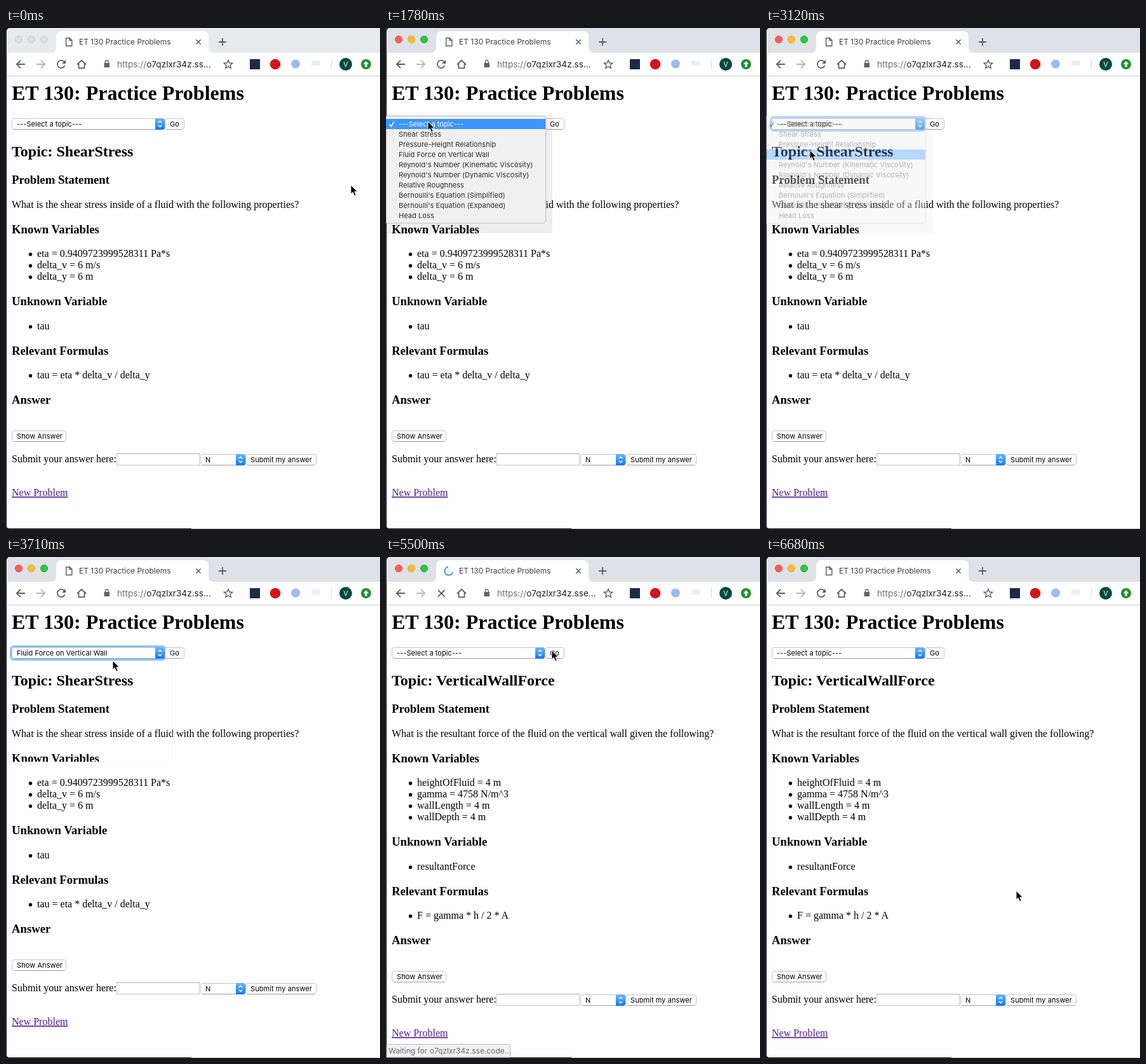
These frames come from a looping animation (589x788 px, 8 s). An HTML page:

```html
<!DOCTYPE html>
<html lang="en">
<head>
<meta charset="utf-8">
<title>Practice Problems</title>
<style>
html, body { margin: 0; width: 100%; height: 100%; overflow: hidden; background: #fff; }
svg { display: block; width: 589px; height: 788px; }
text { white-space: pre; }
.serif { font: 16px "Liberation Serif", "Times New Roman", serif; }
.h1, .h2, .h3 { font: bold 32px "Liberation Serif", "Times New Roman", serif; }
.h2 { font-size: 24px; }
.h3 { font-size: 18.72px; }
.ui { font: 11px Inter, sans-serif; letter-spacing: .07px; }
.tab { font: 12px Inter, sans-serif; fill: #3c4043; }
.url { font: 13.6px Inter, sans-serif; fill: #202124; }
.link { fill: #551a8b; text-decoration: underline; }
.icon { fill: none; stroke: #5a5e63; stroke-width: 1.8; }
</style>
</head>
<body>
<svg id="stage" viewBox="0 0 589 788" xmlns="http://www.w3.org/2000/svg"></svg>
<script>
const LOOP = 8000;
const T = { focus: 1190, ring: 1490, open: 1640, fade: 3120, closed: 3270,
            press: 4760, load: 4900, commit: 5500, badge: 5640, done: 6090 };

// time, x, y of the pointer tip
const POINTER = [
  [0, 543, 247], [300, 522, 218], [450, 395, 134], [590, 190, 64], [740, 60, 94], [890, 27, 140],
  [1490, 60, 148], [1640, 66, 147], [2230, 68, 162], [2380, 69, 177], [2530, 69, 192],
  [3270, 65, 184], [3560, 96, 178], [3710, 168, 163], [3860, 238, 150], [4010, 261, 147],
  [6240, 288, 214], [6390, 342, 372], [6540, 383, 494], [6680, 394, 525]
];
// time, highlighted menu row
const ROWS = [[0, 0], [2230, 1], [2380, 2], [2530, 3]];
const TOPICS = ["---Select a topic---", "Shear Stress", "Pressure-Height Relationship",
  "Fluid Force on Vertical Wall", "Reynold's Number (Kinematic Viscosity)",
  "Reynold's Number (Dynamic Viscosity)", "Relative Roughness",
  "Bernoulli's Equation (Simplified)", "Bernoulli's Equation (Expanded)", "Head Loss"];
const PROBLEMS = [{
  topic: "ShearStress",
  ask: "What is the shear stress inside of a fluid with the following properties?",
  known: ["eta = 0.9409723999528311 Pa*s", "delta_v = 6 m/s", "delta_y = 6 m"],
  unknown: "tau", formula: "tau = eta * delta_v / delta_y"
}, {
  topic: "VerticalWallForce",
  ask: "What is the resultant force of the fluid on the vertical wall given the following?",
  known: ["heightOfFluid = 4 m", "gamma = 4758 N/m^3", "wallLength = 4 m", "wallDepth = 4 m"],
  unknown: "resultantForce", formula: "F = gamma * h / 2 * A"
}];

const text = (x, y, s, cls = "serif", more = "") => `<text x="${x}" y="${y}" class="${cls}" ${more}>${s}</text>`;
const rect = (x, y, w, h, fill, more = "") => `<rect x="${x}" y="${y}" width="${w}" height="${h}" fill="${fill}" ${more}/>`;
const circle = (x, y, r, fill, more = "") => `<circle cx="${x}" cy="${y}" r="${r}" fill="${fill}" ${more}/>`;
const path = (d, more = 'class="icon"') => `<path d="${d}" ${more}/>`;
const group = (id, body, more = "") => `<g id="${id}" ${more}>${body}</g>`;
const item = (y, s) => circle(38.5, y - 4, 2.7, "#000") + text(49, y, s);

function button(x, y, w, label, fill = "#fff", edge = "#c4c4c4") {
  return rect(x + .5, y + .5, w - 1, 17, fill, `rx="3.5" stroke="${edge}"`) +
    path(`M${x + 3} ${y + 17.5}h${w - 6}`, 'stroke="#0003"') +
    text(x + 8, y + 13, label, "ui");
}

function select(x, y, w, label) {
  const r = x + w, c = r - 7.5;
  return rect(x + .5, y + .5, w - 1, 17, "#fff", 'rx="3.5" stroke="#c4c4c4"') +
    path(`M${x + 3} ${y + 17.5}h${w - 6}`, 'stroke="#0003"') +
    path(`M${r - 15} ${y}h11.5a3.5 3.5 0 0 1 3.5 3.5v11a3.5 3.5 0 0 1-3.5 3.5h-11.5z`, 'fill="url(#blue)"') +
    path(`M${c - 2.7} ${y + 7.3}l2.7-2.8 2.7 2.8M${c - 2.7} ${y + 10.7}l2.7 2.8 2.7-2.8`,
      'fill="none" stroke="#fff" stroke-width="1.4"') +
    text(x + 8, y + 13, label, "ui");
}

function problem(p, id) {
  const d = 18 * (p.known.length - 3);
  return group(id,
    text(9, 202, "Topic: " + p.topic, "h2") +
    text(9, 245, "Problem Statement", "h3") + text(9, 283, p.ask) +
    text(9, 323, "Known Variables", "h3") +
    p.known.map((s, i) => item(360 + 18 * i, s)).join("") +
    `<g transform="translate(0 ${d})">` +
    text(9, 436, "Unknown Variable", "h3") + item(474, p.unknown) +
    text(9, 514, "Relevant Formulas", "h3") + item(551, p.formula) +
    text(9, 591, "Answer", "h3") +
    button(9, 633, 86, "Show Answer") +
    text(9, 683, "Submit your answer here:") +
    rect(174.5, 669.5, 130, 18, "#fff", 'stroke="#c6c6c6"') +
    path("M174 669.5h131", 'stroke="#a8a8a8"') +
    select(306, 670, 71, "N") + button(377, 670, 112, "Submit my answer") +
    text(9, 736, "New Problem", "serif link") + "</g>");
}

const lights = (colors, edges) => colors.map((c, i) => circle(20 + 20 * i, 18, 5.5, c, `stroke="${edges[i]}"`)).join("");

function chrome() {
  return group("strip", rect(1, 0, 588, 39, "currentColor")) +
    group("lightsOff", lights(Array(3).fill("#dddfe2"), Array(3).fill("#c9cbce"))) +
    group("lightsOn", lights(["#ff5f57", "#ffbd2e", "#28c940"], ["#e2463f", "#e0a028", "#1dad2b"])) +
    path("M71 39a8 8 0 0 0 8-8V13a8 8 0 0 1 8-8h224a8 8 0 0 1 8 8v18a8 8 0 0 0 8 8z", 'fill="#fff"') +
    group("fileIcon", path("M94.7 15.7h5.6l3.5 3.5v9.1h-9.1zM100 15.7v3.8h3.8", 'class="icon" style="stroke-width:1.4"')) +
    group("spinner", path("M-6.3 1.5A6.5 6.5 0 1 1 4 5.1", 'fill="none" stroke="currentColor" stroke-width="2"')) +
    text(115, 26, "ET 130 Practice Problems", "tab") +
    path("M299.3 18.3l7.4 7.4m0-7.4l-7.4 7.4", 'class="icon" style="stroke-width:1.5"') +
    path("M335 22h12M341 16v12") +
    rect(1, 39, 588, 37, "#fff") + path("M1 75.5h588", 'stroke="#c9cbce"') +
    path("M30 57H17.5M23 50.8l-6.2 6.2 6.2 6.2") +
    path("M48 57h12.5M55 50.8l6.2 6.2-6.2 6.2", 'class="icon" style="stroke:#b4b7bb"') +
    group("reload", path("M92.5 59.2A6 6 0 1 1 91.4 52.8") + path("M94 50v6h-6z", 'fill="#5a5e63"')) +
    group("stop", path("M82 52l10.4 10.4m0-10.4L82 62.4")) +
    path("M112 57.5l7-6.7 7 6.7M114.5 56v7.2h9V56") +
    rect(154.5, 55, 8.6, 7, "#5f6368", 'rx="1"') +
    path("M156.3 55.5v-2a2.5 2.5 0 0 1 5 0v2", 'class="icon" style="stroke-width:1.3"') +
    `<text x="175" y="62" class="url"><tspan fill="#6b7075">https://</tspan>o7qzlxr34z.ss<tspan id="urlTail">...</tspan></text>` +
    path("M350 50.6l1.9 4.4 4.8.4-3.6 3.1 1.1 4.7-4.2-2.5-4.2 2.5 1.1-4.7-3.6-3.1 4.8-.4z", 'class="icon" style="stroke-width:1.4"') +
    rect(384, 49, 16, 16, "#1c2b46") + circle(424, 57, 8.3, "#d2151c") +
    circle(456, 56.5, 7, "#9dbcec") + rect(481, 51, 14, 8, "#efefef") +
    group("badge", rect(454, 59, 16, 12, "#0b50d8", 'rx="1.5"') + circle(458.5, 67.5, .8, "#9fc0ff")) +
    path("M512.5 49v16", 'stroke="#cfd8e6"') +
    circle(535, 57, 10, "#00493f") + text(535, 61, "V", "ui", 'fill="#fff" text-anchor="middle"') +
    circle(567, 57, 8, "#1f8f35") +
    path("M567 52.2l4.4 4.6h-2.8v4.4h-3.2v-4.4h-2.8z", 'fill="#fff"');
}

function menu() {
  return group("menu",
    rect(0, 137, 262, 186, "#0000000f") +
    path("M0 138.5h247a4.5 4.5 0 0 1 4.5 4.5v159.5a4.5 4.5 0 0 1-4.5 4.5H0z", 'fill="#f0f0f0" stroke="#bdbdbd"') +
    group("bar", rect(0, 143, 251, 16, "#3e95fb")) +
    path("M5.2 151.6l2.8 3.2 4.6-7.4", 'id="tick" fill="none" stroke-width="1.6"') +
    TOPICS.map((s, i) => text(20, 155 + 16 * i, s, "ui topic")).join(""));
}

const stage = document.getElementById("stage");
stage.innerHTML = `<defs>
  <linearGradient id="blue" x2="0" y2="1"><stop stop-color="#6db5fb"/><stop offset="1" stop-color="#1277f3"/></linearGradient>
  <linearGradient id="press" x2="0" y2="1"><stop stop-color="#4f9ffa"/><stop offset="1" stop-color="#0b5fe6"/></linearGradient>
  </defs>` +
  rect(0, 0, 589, 788, "#17171a") + rect(292, 786, 297, 2, "#c4c4c4") +
  path("M1 5a5 5 0 0 1 5-5h583v787H5a4 4 0 0 1-4-4z", 'fill="#fefefe"') +
  `<g style="clip-path:path('M1 5a5 5 0 0 1 5-5h583v80H1z')">${chrome()}</g>` +
  text(9, 113, "ET 130: Practice Problems", "h1") +
  group("ring", rect(7.5, 140.5, 244, 21, "none", 'rx="5" stroke="#8fc3f8" stroke-width="3"')) +
  group("topicNone", select(9, 142, 241, TOPICS[0])) +
  group("topicWall", select(9, 142, 241, TOPICS[3])) +
  group("goIdle", button(250, 142, 31, "Go")) +
  group("goDown", button(250, 142, 31, "Go", "url(#press)", "#1a66dc")) +
  problem(PROBLEMS[0], "shear") + problem(PROBLEMS[1], "wall") +
  group("trace", path("M1 137.5h260.5v185H1", 'fill="none" stroke="#f7f7f7"')) +
  menu() +
  group("status", path("M1 766.5h191a4 4 0 0 1 4 4V787H1z", 'fill="#f2f2f2" stroke="#b9b9b9"') +
    text(4, 781, "Waiting for o7qzlxr34z.sse.code...", "tab", 'style="fill:#66696d"')) +
  group("pointer", path("M0 0V14.2L3.2 11.2 5.7 16.8 8.2 15.7 5.8 10.3H10.4Z", 'fill="#000" stroke="#fff" stroke-width="1"'));

const el = {};
stage.querySelectorAll("[id]").forEach(e => el[e.id] = e);
const topics = [...stage.querySelectorAll(".topic")];
const show = (id, on) => { el[id].style.display = on ? "" : "none"; };
const latest = (table, t) => table.reduce((a, b) => b[0] <= t ? b : a);

function draw(t) {
  const within = (a, b) => t >= a && t < b;
  const active = t >= T.focus, loading = within(T.load, T.done), fresh = t >= T.commit;
  el.strip.style.color = active ? "#dee1e6" : "#e7e9ed";
  show("lightsOn", active);
  show("lightsOff", !active);
  show("fileIcon", !loading);
  show("spinner", loading);
  show("reload", !loading);
  show("stop", loading);
  show("status", loading);
  show("badge", within(T.badge, T.done));
  el.urlTail.textContent = loading ? "e..." : "...";

  const turn = Math.floor((t - 5790) / 147) * (fresh ? 75 : -60);
  el.spinner.setAttribute("transform", `translate(99 22) rotate(${turn})`);
  el.spinner.style.color = fresh ? "#4193dc" : "#8b9096";

  show("ring", within(T.ring, T.press));
  const wallPicked = within(T.closed, T.commit);
  show("topicWall", wallPicked);
  show("topicNone", !wallPicked);
  const pressed = within(T.press, T.load);
  show("goDown", pressed);
  show("goIdle", !pressed);
  show("shear", !fresh);
  show("wall", fresh);
  show("trace", within(T.closed, T.commit));

  show("menu", within(T.open, T.closed));
  el.menu.style.opacity = t >= T.fade ? .36 : 1;
  const row = latest(ROWS, t)[1];
  el.bar.setAttribute("transform", `translate(0 ${16 * row})`);
  el.tick.setAttribute("stroke", row ? "#222" : "#fff");
  topics.forEach((e, i) => e.setAttribute("fill", i === row ? "#fff" : "#2a2a2a"));

  const [, x, y] = latest(POINTER, t);
  el.pointer.setAttribute("transform", `translate(${x} ${y})`);
}

const start = performance.now();
function tick() {
  draw((performance.now() - start) % LOOP);
  requestAnimationFrame(tick);
}
tick();
</script>
</body>
</html>
```
